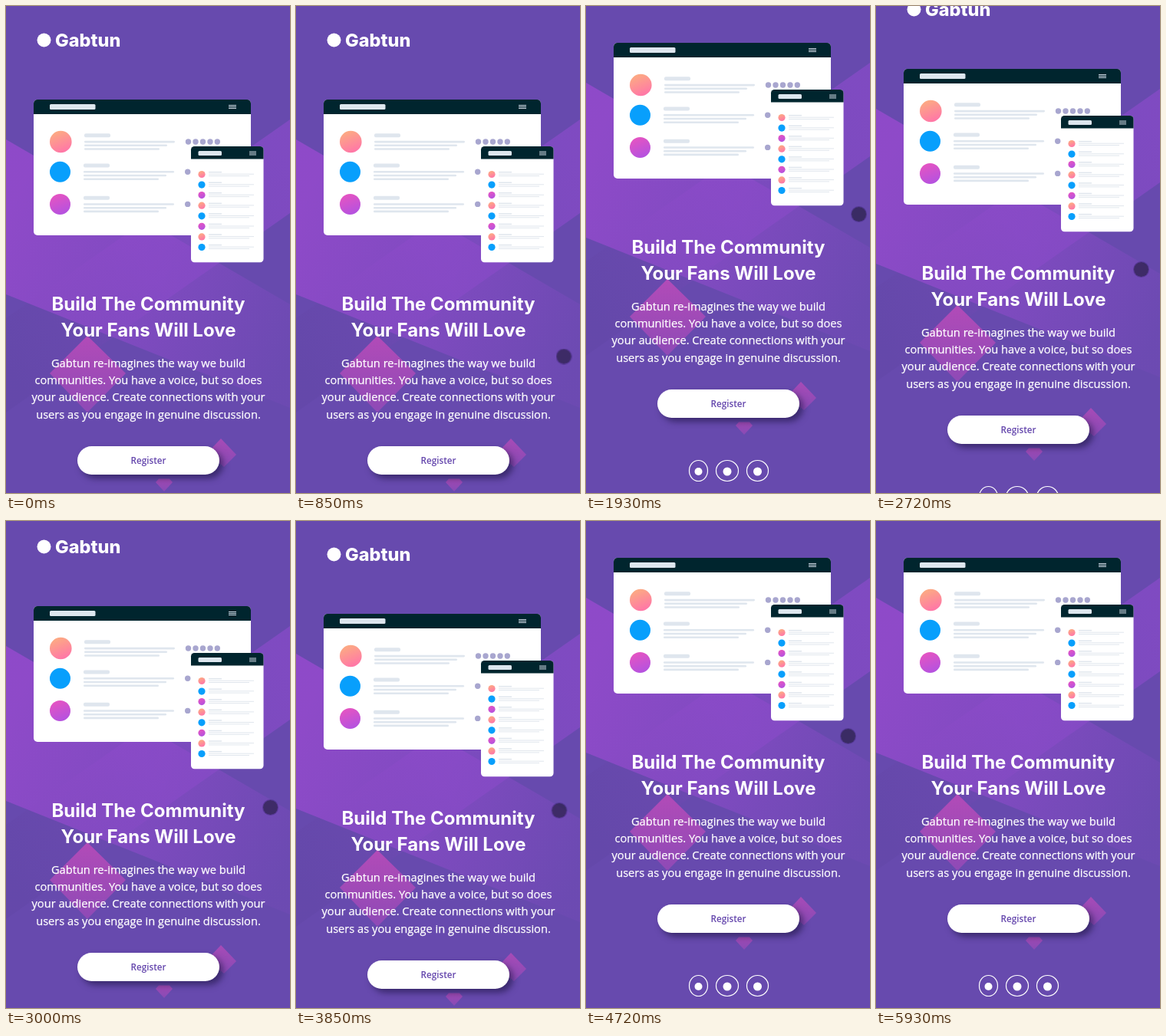
Recreate the animation shown at these times as an HTML page. Size 370 by 635 pixels, loop 6.67 s.

```html
<!DOCTYPE html>
<html lang="en">
<head>
<meta charset="utf-8">
<title>Gabtun</title>
<style>
  html, body { margin: 0; width: 100%; height: 100%; overflow: hidden; background: #674aae; }
  .stage { position: relative; width: 370px; height: 635px; overflow: hidden; }
  .page { position: absolute; left: 0; top: 0; display: block; animation: scroll 6670ms steps(1) infinite; }
  .touch {
    position: absolute; left: -11px; top: -11px; width: 19px; height: 19px;
    border: 1.5px solid rgba(45, 25, 95, .35); border-radius: 50%;
    background: rgba(32, 25, 55, .62); background-clip: padding-box;
    animation: touch 6670ms steps(1) infinite;
  }
  text { fill: #fff; text-anchor: middle; }
  .brand { font: 800 23.5px Inter, sans-serif; text-anchor: start; }
  .title { font: 700 24px Inter, sans-serif; }
  .copy { font: 400 14.65px "Open Sans", sans-serif; stroke: #fff; stroke-width: .25px; }
  .label { font: 600 11.7px "Open Sans", sans-serif; fill: #6547ad; }
  .button { fill: #fff; filter: drop-shadow(5px 5px 4px rgba(20, 12, 55, .55)); }

  /* Each steps(n) counts the redraws up to the next keyframe. */
  @keyframes scroll {
    0% { transform: translateY(0); }
    20.839% { transform: translateY(-3px); }
    21.889% { transform: translateY(-17px); animation-timing-function: steps(3); }
    25.037% { transform: translateY(-68px); }
    25.937% { transform: translateY(-74px); }
    38.830% { transform: translateY(-64px); animation-timing-function: steps(2); }
    40.779% { transform: translateY(-40px); animation-timing-function: steps(3); }
    43.928% { transform: translateY(-16px); }
    44.977% { transform: translateY(-11px); animation-timing-function: steps(3); }
    47.976% { transform: translateY(-2px); animation-timing-function: steps(2); }
    50.824% { transform: translateY(0); }
    57.721% { transform: translateY(-1px); animation-timing-function: steps(6); }
    63.868% { transform: translateY(-44px); }
    64.767% { transform: translateY(-50px); }
    65.817% { transform: translateY(-56px); animation-timing-function: steps(3); }
    68.815%, 100% { transform: translateY(-74px); }
  }
  @keyframes touch {
    0% { transform: translate(362px, 670px); opacity: .75; }
    1.349% { transform: translate(362px, 632px); opacity: .75; animation-timing-function: steps(5); }
    6.506% { transform: translate(344px, 520px); opacity: .75; animation-timing-function: steps(4); }
    10.644% { transform: translate(349px, 459px); opacity: .75; }
    11.694% { transform: translate(349.5px, 457.5px); opacity: .88; }
    12.743% { transform: translate(349.5px, 457.5px); opacity: 1; }
    15.742% { transform: translate(349px, 452px); animation-timing-function: steps(3); }
    18.890% { transform: translate(344px, 425px); animation-timing-function: steps(3); }
    21.889% { transform: translate(338px, 383px); animation-timing-function: steps(3); }
    25.037% { transform: translate(345px, 332px); }
    25.937% { transform: translate(348px, 316px); animation-timing-function: steps(3); }
    28.935% { transform: translate(356px, 272px); animation-timing-function: steps(3); }
    31.934% { transform: translate(357px, 266px); }
    34.932% { transform: translate(356px, 272px); animation-timing-function: steps(6); }
    40.779% { transform: translate(346px, 344px); animation-timing-function: steps(3); }
    43.928% { transform: translate(345px, 369px); }
    44.977% { transform: translate(345px, 374px); animation-timing-function: steps(7); }
    51.724% { transform: translate(344px, 393px); }
    54.872% { transform: translate(344px, 391px); animation-timing-function: steps(3); }
    57.721% { transform: translate(343.5px, 378px); animation-timing-function: steps(6); }
    63.868% { transform: translate(343.5px, 327px); }
    64.767% { transform: translate(343px, 320px); }
    65.817% { transform: translate(343px, 314px); animation-timing-function: steps(5); }
    70.764% { transform: translate(342px, 281px); opacity: 1; }
    80.809% { transform: translate(342px, 284px); opacity: .75; animation-timing-function: steps(4); }
    84.857% { transform: translate(346px, 420px); opacity: .75; animation-timing-function: steps(4); }
    88.905%, 100% { transform: translate(354px, 670px); opacity: .75; }
  }
</style>
</head>
<body>
<div class="stage">
<svg class="page" width="370" height="709" viewBox="0 0 370 709">
  <defs>
    <linearGradient id="rise" gradientUnits="userSpaceOnUse" x1="370" y1="209" x2="0" y2="468">
      <stop offset="0" stop-color="#8f4bce" stop-opacity=".6"/>
      <stop offset=".5" stop-color="#8f4bce" stop-opacity=".45"/>
      <stop offset=".8" stop-color="#6847aa" stop-opacity=".3"/>
      <stop offset="1" stop-color="#6045a4" stop-opacity=".4"/>
    </linearGradient>
    <linearGradient id="fall" gradientUnits="userSpaceOnUse" x1="0" y1="275" x2="370" y2="456">
      <stop offset="0" stop-color="#954acd" stop-opacity=".85"/>
      <stop offset=".5" stop-color="#904bcc" stop-opacity=".6"/>
      <stop offset="1" stop-color="#8a4bc8" stop-opacity=".15"/>
    </linearGradient>
    <linearGradient id="gem" x1="0" y1="0" x2="0" y2="1">
      <stop offset="0" stop-color="#b24bb8"/>
      <stop offset="1" stop-color="#8e4ab6"/>
    </linearGradient>
    <linearGradient id="peach" x1=".2" y1="0" x2=".6" y2="1">
      <stop offset="0" stop-color="#fcae80"/>
      <stop offset="1" stop-color="#ff76a8"/>
    </linearGradient>
    <linearGradient id="orchid" x1=".2" y1="0" x2=".6" y2="1">
      <stop offset="0" stop-color="#e854c0"/>
      <stop offset="1" stop-color="#b452e0"/>
    </linearGradient>
    <g id="bars" fill="#dfe6ee">
      <rect width="34" height="5" rx="2"/>
      <rect y="9.5" width="118" height="2.6" rx="1.3"/>
      <rect y="14.2" width="108" height="2.6" rx="1.3"/>
      <rect y="18.9" width="98" height="2.6" rx="1.3"/>
    </g>
    <g id="item">
      <circle r="4.6"/>
      <g fill="#e0e6ed">
        <rect x="9" y="-3.6" width="17" height="1.5"/>
        <rect x="9" y="-.8" width="59" height="1"/>
        <rect x="9" y="1.5" width="53" height="1"/>
      </g>
    </g>
    <g id="pair">
      <use href="#item" fill="url(#peach)"/>
      <use href="#item" y="13.6" fill="#089ffc"/>
    </g>
    <g id="trio">
      <use href="#pair"/>
      <use href="#item" y="27.1" fill="url(#orchid)"/>
    </g>
    <path id="menu" d="M0 .5H10M0 2.5H10M0 4.5H10" stroke="#d5dce8"/>
    <circle id="dot" r="3.7" fill="#a8a6cf"/>
  </defs>

  <rect width="370" height="709" fill="#674aae"/>
  <path d="M370 148V270L0 530V407Z" fill="url(#rise)"/>
  <path d="M0 174L370 389V524L0 376Z" fill="url(#fall)"/>

  <g fill="url(#gem)">
    <path d="M106 430L156 479L106 530L57 479Z"/>
    <path d="M280 564L300 585L284 601L262 583Z" opacity=".85"/>
    <path d="M199 616.5H213L217 621L206 633L195 621Z" opacity=".8"/>
  </g>

  <circle cx="49.5" cy="44.5" r="9" fill="#fff"/>
  <text class="brand" x="64" y="53">Gabtun</text>

  <rect x="36" y="122" width="283" height="177" rx="5" fill="#fff"/>
  <path d="M36 141V127a5 5 0 0 1 5-5H314a5 5 0 0 1 5 5V141Z" fill="#00252e"/>
  <rect x="57" y="128" width="59.5" height="7" rx="1.5" fill="#dde6ee"/>
  <use href="#menu" x="290" y="129"/>
  <circle cx="71.3" cy="177" r="14.3" fill="url(#peach)"/>
  <circle cx="70.5" cy="216.2" r="13.5" fill="#089ffc"/>
  <circle cx="70.5" cy="258.4" r="13.5" fill="url(#orchid)"/>
  <use href="#bars" x="102" y="166.3"/>
  <use href="#bars" x="101" y="205.5"/>
  <use href="#bars" x="101" y="247.7"/>
  <use href="#dot" x="237.5" y="177"/>
  <use href="#dot" x="247" y="177"/>
  <use href="#dot" x="256.5" y="177"/>
  <use href="#dot" x="266" y="177"/>
  <use href="#dot" x="275.3" y="177"/>
  <use href="#dot" x="236.7" y="216.2"/>
  <use href="#dot" x="236.7" y="258.4"/>

  <rect x="241" y="183" width="94.5" height="151.3" rx="4.5" fill="#fff"/>
  <path d="M241 199.5V187.5a4.5 4.5 0 0 1 4.5-4.5H331a4.5 4.5 0 0 1 4.5 4.5V199.5Z" fill="#00252e"/>
  <rect x="250.5" y="189" width="30.5" height="6" rx="1.5" fill="#dde6ee"/>
  <use href="#menu" transform="translate(317 189.5) scale(.9 1)"/>
  <use href="#trio" x="255" y="219.5"/>
  <use href="#trio" x="255" y="260.2"/>
  <use href="#pair" x="255" y="300.9"/>

  <g class="title">
    <text x="185.5" y="397">Build The Community</text>
    <text x="185.5" y="431">Your Fans Will Love</text>
  </g>
  <g class="copy">
    <text x="185.5" y="471">Gabtun re-imagines the way we build</text>
    <text x="185.5" y="493">communities. You have a voice, but so does</text>
    <text x="185.5" y="515.3">your audience. Create connections with your</text>
    <text x="185.5" y="538">users as you engage in genuine discussion.</text>
  </g>

  <rect class="button" x="93" y="574" width="185" height="37" rx="18.5"/>
  <text class="label" x="185.5" y="597">Register</text>

  <g fill="none" stroke="#fff" stroke-width="1.2">
    <ellipse cx="146.5" cy="680" rx="12" ry="13.5"/>
    <ellipse cx="184" cy="680" rx="14.5" ry="13.5"/>
    <ellipse cx="223.5" cy="680" rx="14" ry="13.5"/>
  </g>
  <g fill="#fff">
    <circle cx="146.5" cy="681" r="5"/>
    <circle cx="184" cy="681" r="5.5"/>
    <circle cx="223.5" cy="681" r="5.5"/>
  </g>
</svg>
<div class="touch"></div>
</div>
</body>
</html>
```
